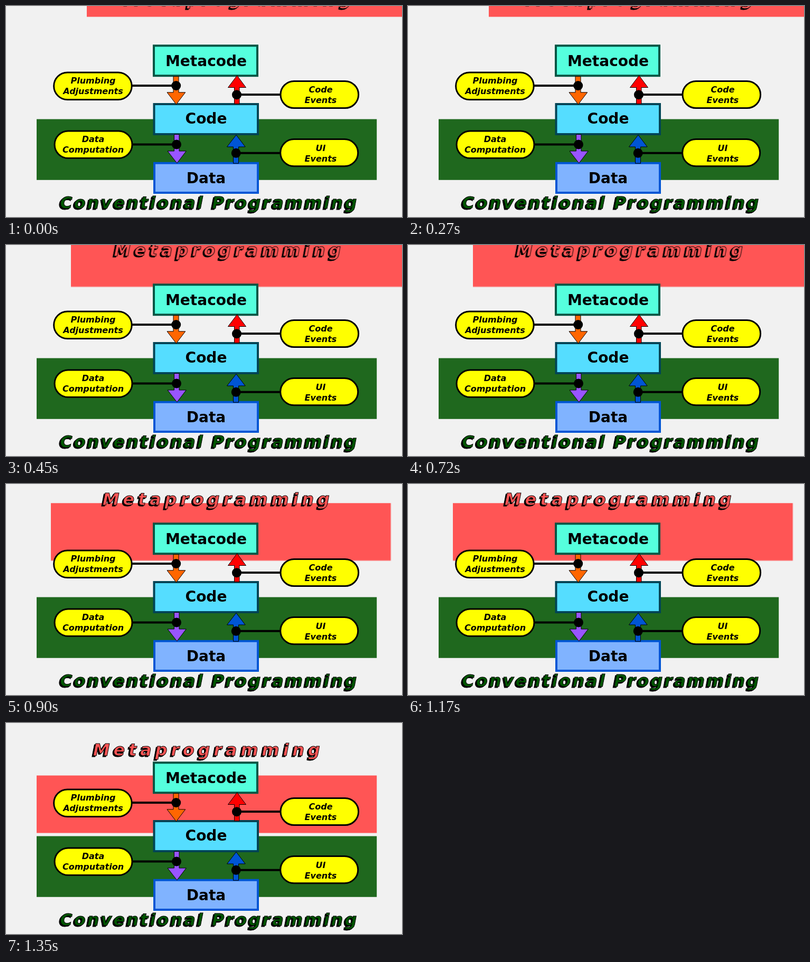
An HTML page for the animation above (1800 ms loop, 750 by 400 pixels).

```html
<!DOCTYPE html>
<html lang="en">
<head>
<meta charset="utf-8">
<title>Metaprogramming layers</title>
<style>
  html, body { margin: 0; width: 100%; height: 100%; overflow: hidden; background: #f1f1f1; }
  svg { display: block; width: 750px; height: 400px; }
  text { font-family: "DejaVu Sans", sans-serif; font-weight: bold; }

  .title { font-size: 32px; font-style: oblique; stroke: #000; stroke-width: 1; }
  .meta { letter-spacing: 6.8px; fill: #f55; }
  .conventional { letter-spacing: 3.04px; fill: #050; }
  .title .shadow { fill: #000; }

  .box { stroke-width: 4; }
  .box-name { font-size: 28px; text-anchor: middle; }
  .arrows { stroke: #000; stroke-width: 1; }
  .links { stroke: #000; stroke-width: 4; }
  .pills { fill: #ff0; stroke: #000; stroke-width: 3; }
  .labels { font-size: 16px; font-style: oblique; text-anchor: middle; }

  /* The upper layer drops into place in four hard steps. */
  .band { animation: band 1.8s step-end infinite; }
  .heading { animation: heading 1.8s step-end infinite; }
  @keyframes band {
    0%   { transform: translate(94.5px, -188px); }
    25%  { transform: translate(65px, -129.5px); }
    50%  { transform: translate(26.5px, -63.5px); }
    75%, 100% { transform: none; }
  }
  @keyframes heading {
    0%   { transform: translate(60px, -64px); }
    25%  { transform: translate(39.5px, -41px); }
    50%  { transform: translate(18px, -22px); }
    75%, 100% { transform: none; }
  }
</style>
</head>
<body>
<svg viewBox="0 0 750 400">
  <rect x="58" y="214.5" width="644.2" height="115.3" fill="#1f681e"/>
  <rect class="band" x="58" y="99.5" width="644.2" height="109" fill="#f55"/>

  <g class="heading">
    <g class="title meta">
      <text class="shadow" x="162.3" y="64">Metaprogramming</text>
      <text x="164.8" y="62">Metaprogramming</text>
    </g>
  </g>
  <g class="title conventional">
    <text class="shadow" x="99.7" y="386">Conventional Programming</text>
    <text x="102.2" y="384">Conventional Programming</text>
  </g>

  <g class="box">
    <rect x="280" y="75.2" width="196" height="57" fill="#5fd" stroke="#005544"/>
    <rect x="280.5" y="186" width="196.5" height="57" fill="#5df" stroke="#004455"/>
    <rect x="281" y="297.8" width="196" height="56.2" fill="#80b3ff" stroke="#0055d4"/>
  </g>
  <g class="box-name">
    <text x="379" y="113.5">Metacode</text>
    <text x="379" y="223">Code</text>
    <text x="379" y="336">Data</text>
  </g>

  <g class="arrows">
    <path fill="#f60" d="M317 133.5h10v30.3h12.7L322.4 186.5 305 163.8h12z"/>
    <path fill="#f00" d="M437.6 131.8L454.5 154.5H442v31h-9.5v-31h-12z"/>
    <path fill="#95f" d="M318.5 243.5h9.5V275h13.3L323.8 298 306 275h12.5z"/>
    <path fill="#0055d4" d="M436 244.5L453.2 267H440.5v31.3h-10V267h-12z"/>
  </g>

  <g class="links">
    <path d="M238 151h84M437 168h84M238 262.5h85M436 278.8h84"/>
  </g>
  <circle cx="322.2" cy="151" r="9"/>
  <circle cx="437" cy="168.2" r="9"/>
  <circle cx="323" cy="262.5" r="9"/>
  <circle cx="435.7" cy="278.8" r="9"/>

  <g class="pills">
    <rect x="90.6" y="126" width="147.6" height="51.5" rx="25.75"/>
    <rect x="520" y="142.4" width="147.6" height="51.2" rx="25.6"/>
    <rect x="92" y="237" width="147" height="51.5" rx="25.75"/>
    <rect x="519.7" y="252.6" width="147" height="51.2" rx="25.6"/>
  </g>
  <g class="labels">
    <text x="165" y="147">Plumbing</text>
    <text x="165" y="167">Adjustments</text>
    <text x="596" y="164.3">Code</text>
    <text x="596" y="184.3">Events</text>
    <text x="165" y="258">Data</text>
    <text x="165" y="278">Computation</text>
    <text x="596" y="274.5">UI</text>
    <text x="596" y="294.5">Events</text>
  </g>
</svg>
</body>
</html>
```
